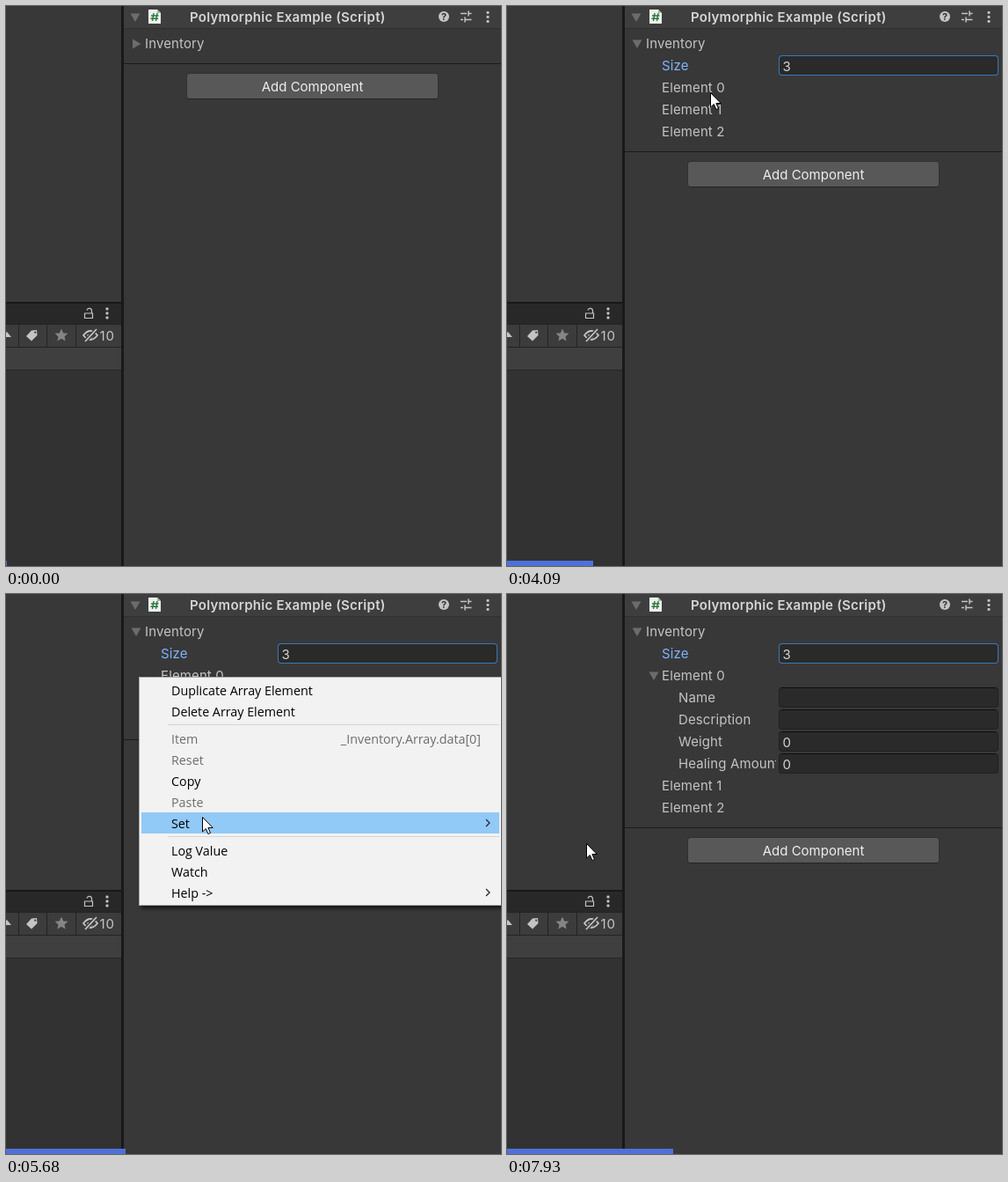
Animation, 563 px wide and 636 px high, one loop 7.99 s. Source, as an HTML page with a canvas:

```html
<!DOCTYPE html>
<html lang="en">
<head>
<meta charset="utf-8">
<title>Inspector list demo</title>
<style>
  html, body { margin: 0; width: 100%; height: 100%; overflow: hidden; background: #383838; }
  canvas { display: block; }
</style>
</head>
<body>
<canvas id="stage" width="563" height="636"></canvas>
<script>
const ctx = document.getElementById('stage').getContext('2d');
const LOOP = 7990;
const UI = '15px Inter, sans-serif';
const UI_BOLD = '600 15px Inter, sans-serif';
const MENU = '14.3px "Open Sans", sans-serif';
const LABEL = '#c4c4c4', ACTIVE = '#81b4ff', HOVER = '#91c9f7';

// Moments at which the interface changes, in ms
const AT = { unfold: 1080, focus: 2050, type: 2720, apply: 3050, menu: 4620, submenu: 6000, choose: 6960 };

// Pointer path: time, x, y
const PATH = [
  [0, -14, 190], [200, -14, 190], [850, 146, 49], [1050, 150, 42], [1250, 155, 41],
  [1350, 156, 41], [1530, 230, 27], [1710, 310, 58], [1900, 355, 64], [3450, 359, 64],
  [3600, 358, 62], [4090, 231, 98], [4290, 229, 96], [4450, 226, 80], [4600, 223, 94],
  [5080, 223, 94], [5150, 223, 97], [5500, 223, 250], [5680, 223, 253], [6050, 222, 253],
  [6400, 140, 258], [6750, 104, 274], [7000, 104, 274], [7530, 50, 297], [7650, 6, 303],
  [7930, 90, 283], [LOOP, 90, 283]
];

// Context menu rows: label, centre y, enabled
const MENU_ROWS = [
  ['Duplicate Array Element', 110, true], ['Delete Array Element', 134, true],
  ['Item', 165, false], ['Reset', 189, false], ['Copy', 213, true], ['Paste', 237, false],
  ['Set', 261, true], ['Log Value', 292, true], ['Watch', 316, true], ['Help ->', 340, true]
];
const TYPES = ['Null', 'Potion', 'Weapon', 'Armour'];

function pointerAt(t) {
  const i = PATH.findIndex(p => p[0] > t);
  const [t0, x0, y0] = PATH[i - 1], [t1, x1, y1] = PATH[i];
  const u = (t - t0) / (t1 - t0), k = u * u * (3 - 2 * u);
  return { x: Math.round(x0 + (x1 - x0) * k), y: Math.round(y0 + (y1 - y0) * k) };
}

function rect(x, y, w, h, color) {
  ctx.fillStyle = color;
  ctx.fillRect(x, y, w, h);
}

function rounded(x, y, w, h, r, color) {
  ctx.fillStyle = color;
  ctx.beginPath();
  ctx.roundRect(x, y, w, h, r);
  ctx.fill();
}

function text(str, x, y, { color = LABEL, font = UI, align = 'left', spacing = 0 } = {}) {
  ctx.font = font;
  ctx.letterSpacing = spacing + 'px';
  ctx.fillStyle = color;
  ctx.textAlign = align;
  ctx.fillText(str, x, y);
}

function shape(d, x, y, fill, stroke, width = 1) {
  const path = new Path2D(d);
  ctx.save();
  ctx.translate(x, y);
  if (fill) { ctx.fillStyle = fill; ctx.fill(path); }
  if (stroke) { ctx.strokeStyle = stroke; ctx.lineWidth = width; ctx.stroke(path); }
  ctx.restore();
}

function dots(x, y) {
  for (const dy of [-5, 0, 5]) rounded(x - 1.5, y + dy - 1.5, 3, 3, 1, LABEL);
}

function foldout(x, y, open) {
  shape(open ? 'M-5.5-4.5H5.5L0 5Z' : 'M-4-5.5L5.5 0L-4 5.5Z', x, y, '#6c6c6c');
}

function drawLeftPanel() {
  rect(0, 0, 131, 336, '#383838');
  rect(0, 336, 131, 2, '#191919');
  rect(0, 338, 131, 23, '#282828');
  rect(0, 361, 131, 1, '#232323');
  rect(0, 362, 131, 25, '#3c3c3c');
  rect(0, 387, 131, 1, '#232323');
  rect(0, 388, 131, 25, '#3f3f3f');
  rect(0, 413, 131, 1, '#262626');
  rect(0, 414, 131, 222, '#323232');
  for (const x of [14, 46, 79]) rect(x, 362, 1, 25, '#232323');

  shape('M.5 6.5H9.5V12H.5ZM8.5 6.5V3.5A2.8 2.8 0 0 0 3 3', 89, 342.5, null, LABEL, 1.2);
  dots(115, 349);
  shape('M-5 6L1 0L6 6Z', 0, 370, LABEL);
  shape('M0 7L6 .5L12 0L12.5 6L6 12.5ZM10.2 1.6A1.1 1.1 0 1 0 10.3 3.8A1.1 1.1 0 1 0 10.2 1.6Z', 23, 368, LABEL);
  shape('M0-7.5L2.2-2.6L7.4-2.2L3.5 1.4L4.6 6.6L0 3.8L-4.6 6.6L-3.5 1.4L-7.4-2.2L-2.2-2.6Z', 63, 374, '#858585');
  shape('M-8 0Q0-10 8 0Q0 10-8 0Z', 96, 374, null, LABEL, 1.8);
  shape('M-3.5-1A3.5 3.5 0 0 0 1 3.5L3.5-1Z', 96, 374, LABEL);
  shape('M-6 7L7-7', 96, 374, null, '#3c3c3c', 4.5);
  shape('M-6 7L7-7', 96, 374, null, LABEL, 1.8);
  text('10', 106.5, 380, { spacing: 0.8 });
}

function drawHeader() {
  rect(134, 0, 429, 25, '#3e3e3e');
  rect(134, 25, 429, 1, '#303030');
  foldout(147, 13, true);
  shape('M0 0H10L14 4V16H0Z', 162, 4, '#edf1ed');
  shape('M10 0V4H14Z', 162, 4, '#a9b0a9');
  shape('M6 4L4.5 13M10 4L8.5 13M3 7H11.5M2.5 10.3H11', 162, 4, null, '#28783a', 1.4);
  text('Polymorphic Example (Script)', 209, 18, { color: '#d6d6d6', font: UI_BOLD, spacing: 0.26 });
  rounded(492, 6, 12, 12, 6, LABEL);
  text('?', 498, 16, { color: '#333', font: '700 11px Inter, sans-serif', align: 'center' });
  shape('M-6-3H1M3-3H6.5M3-6V0M-6 4H-3M-1 4H6.5M-1 1V7', 523, 11.5, null, LABEL, 1.5);
  dots(548, 12.5);
}

function field(y, value, focused) {
  rounded(309, y - 12, 250, 23, 4, focused ? '#3a79bb' : '#202020');
  if (!focused) rect(312, y - 12, 244, 1, '#0d0d0d');
  rounded(310, y - 11, 248, 21, 3, '#2a2a2a');
  text(value, 313.5, y + 6, { color: '#d2d2d2' });
}

function drawInspector(t) {
  const open = t >= AT.unfold, focused = t >= AT.focus;
  const applied = t >= AT.apply, chosen = t >= AT.choose;
  let y = 43;
  const row = (label, x, color) => text(label, x, y + 5, { color, spacing: 0.12 });

  foldout(148, y, open);
  row('Inventory', 158);
  if (open) {
    y += 25;
    row('Size', 176, focused ? ACTIVE : LABEL);
    field(y, t < AT.type ? '0' : '3', focused);
    if (focused && t < AT.type) {
      rect(313, y - 8, 10, 17, '#3a6ea5');
      text('0', 313.5, y + 6, { color: '#d2d2d2' });
    }
  }
  if (applied) {
    for (let i = 0; i < 3; i++) {
      y += 25;
      row('Element ' + i, 176);
      if (i > 0 || !chosen) continue;
      foldout(167, y, true);
      for (const [name, value] of [['Name', ''], ['Description', ''], ['Weight', '0'], ['Healing Amount', '0']]) {
        y += 25;
        ctx.save();
        ctx.beginPath();
        ctx.rect(134, 0, 172, 636);
        ctx.clip();
        row(name, 195);
        ctx.restore();
        field(y, value, false);
      }
    }
  }

  const line = y + 22;
  rect(134, line, 429, 1, '#1a1a1a');
  rounded(205, line + 11, 287, 30, 4, '#303030');
  rect(208, line + 40, 281, 1, '#242424');
  rounded(206, line + 12, 285, 28, 3, '#585858');
  text('Add Component', 348.5, line + 32, { color: '#eee', align: 'center' });
}

function menuBox(x, y, w, h) {
  ctx.save();
  ctx.shadowColor = 'rgba(0,0,0,.6)';
  ctx.shadowBlur = 4;
  ctx.shadowOffsetX = ctx.shadowOffsetY = 3;
  rect(x, y, w, h, '#a8a8a8');
  ctx.restore();
  rect(x + 1, y + 1, w - 2, h - 2, '#f2f2f2');
}

function drawMenu(t, pointer) {
  const submenu = t >= AT.submenu;
  const item = (label, x, y, color = '#000', align) => text(label, x, y + 5, { color, font: MENU, align });
  menuBox(151, 94, 420, 260);
  rect(184, 148, 377, 1, '#d5d5d5');
  rect(184, 275, 377, 1, '#d5d5d5');
  for (const [label, y, enabled] of MENU_ROWS) {
    const over = Math.abs(pointer.y - y) < 12 && pointer.x > 154;
    if (submenu ? label === 'Set' : enabled && over) rect(154, y - 13, 407, 24, HOVER);
    item(label, 188, y, enabled ? '#000' : '#6d6d6d');
    if (label === 'Set' || label === 'Help ->') shape('M0-4L4 0L0 4', 546, y - 1, null, '#222', 1.2);
  }
  item('_Inventory.Array.data[0]', 540, 165, '#6d6d6d', 'right');

  if (!submenu) return;
  menuBox(3, 245, 151, 102);
  TYPES.forEach((name, i) => {
    const y = 261 + 24 * i;
    if (pointer.x < 152 && Math.abs(pointer.y - y) <= 12) rect(6, y - 13, 145, 24, HOVER);
    item(name, 40, y);
  });
  rect(6, 248, 24, 24, HOVER);
  shape('M-5 0L-2 3.5L5.5-4', 17, 260, null, '#111', 1.4);
}

function drawPointer({ x, y }, t) {
  const overField = t >= AT.unfold && t < AT.menu && x > 309 && x < 559 && y > 56 && y < 80;
  if (overField) {
    shape('M-3-8H-1L0-7L1-8H3M0-7V7M-3 8H-1L0 7L1 8H3', x + 0.5, y + 6, null, '#ddd');
  } else {
    shape('M0 0V16.5L3.8 13L6.4 19L9 17.9L6.4 12H11.7Z', x + 0.5, y + 0.5, '#fff', '#000');
  }
}

function draw(now) {
  const t = now % LOOP;
  const pointer = pointerAt(t);
  rect(0, 0, 563, 636, '#383838');
  drawLeftPanel();
  rect(131, 0, 3, 636, '#191919');
  drawHeader();
  drawInspector(t);
  if (t >= AT.menu && t < AT.choose) drawMenu(t, pointer);
  drawPointer(pointer, t);
  rect(0, 630, Math.round(1 + t * 0.0237), 6, '#4f72d9');
}

const start = performance.now();
function tick() {
  draw(performance.now() - start);
  requestAnimationFrame(tick);
}
tick();
</script>
</body>
</html>
```
